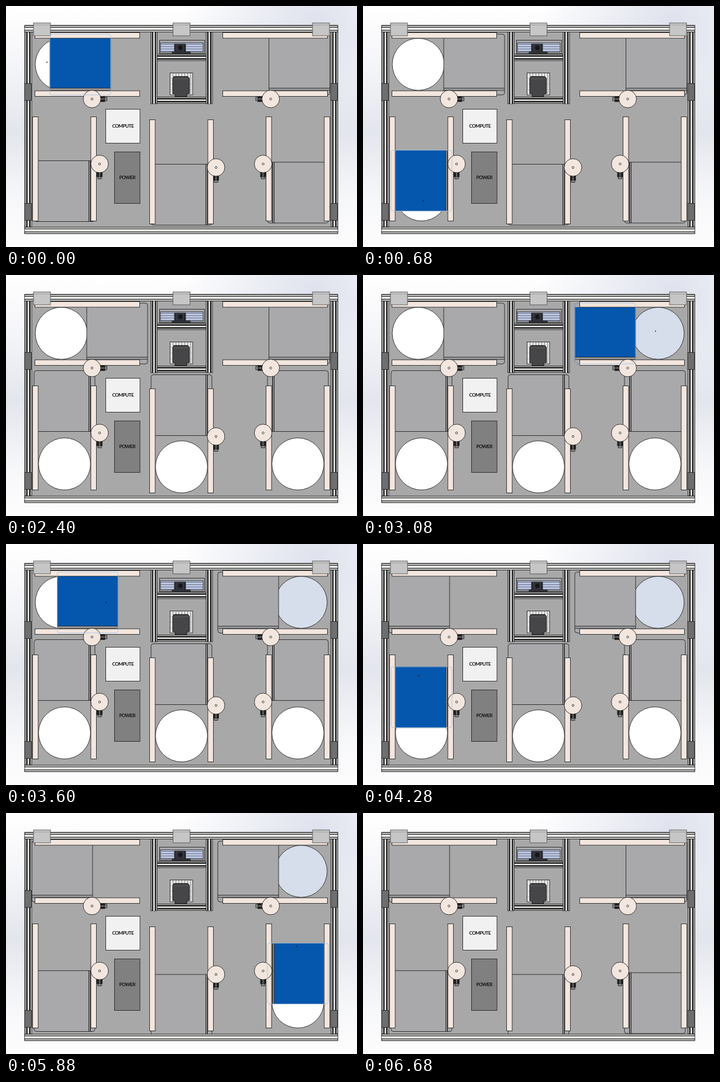
Animation of 600 by 412 pixels, one loop 6800 ms. Source, as an HTML page:

```html
<!DOCTYPE html>
<html lang="en">
<head>
<meta charset="utf-8">
<title>Sliding tray layout</title>
<style>
html, body { margin: 0; width: 100%; height: 100%; overflow: hidden; background: #fff; }
svg { display: block; width: 600px; height: 412px; }
text { font: 700 8.3px Lato, "Open Sans", sans-serif; letter-spacing: -.6px; text-anchor: middle; fill: #141414; }
</style>
</head>
<body>
<svg id="stage" viewBox="0 0 600 412" xmlns="http://www.w3.org/2000/svg">
  <defs>
    <linearGradient id="side" x1="0" y1="0" x2="0" y2="1">
      <stop offset="0" stop-color="#fff"/>
      <stop offset=".25" stop-color="#f4f5f8"/>
      <stop offset=".52" stop-color="#e4e6ed"/>
      <stop offset=".8" stop-color="#f6f7f9"/>
      <stop offset="1" stop-color="#fdfdfe"/>
    </linearGradient>
    <radialGradient id="haze" gradientUnits="userSpaceOnUse" cx="530" cy="30" r="230">
      <stop offset="0" stop-color="#dfe2ed"/>
      <stop offset="1" stop-color="#dfe2ed" stop-opacity="0"/>
    </radialGradient>
  </defs>
  <rect width="600" height="412" fill="url(#side)"/>
  <rect width="600" height="412" fill="url(#haze)"/>
</svg>
<script>
const stage = document.getElementById('stage');
const LOOP = 6800, SIZE = 104;
const INK = '#262626', WOOD = '#f2e6de', BLUE = '#0457ad', GLOW = '#a9c3e3';

function add(parent, tag, attrs, text) {
  const el = document.createElementNS(stage.namespaceURI, tag);
  for (const key in attrs) el.setAttribute(key, attrs[key]);
  if (text) el.textContent = text;
  parent.appendChild(el);
  return el;
}
const layer = () => add(stage, 'g', {});
const box = (parent, x, y, width, height, fill, stroke = INK, rx = 0) =>
  add(parent, 'rect', { x, y, width, height, fill, stroke, rx, 'stroke-width': .9 });
const line = (parent, x1, y1, x2, y2, stroke = INK, width = 1) =>
  add(parent, 'line', { x1, y1, x2, y2, stroke, 'stroke-width': width });
const disc = (parent, cx, cy, r, fill) =>
  add(parent, 'circle', { cx, cy, r, fill, stroke: INK, 'stroke-width': .9 });

// Slotted aluminium profile; grooves run along the longer side.
function profile(parent, x, y, w, h, slot) {
  box(parent, x, y, w, h, '#cbccca', '#222');
  const mid = Math.min(w, h) / 2;
  const groove = (d, color, width) => w > h
    ? line(parent, x, y + d, x + w, y + d, color, width)
    : line(parent, x + d, y, x + d, y + h, color, width);
  groove(mid, '#f0f0ed', 2.4);
  for (const off of [-2.5, 2.5]) groove(mid + off, '#1d1d1d', slot);
}

// Bays with two upright rails: left edge and top
const bays = [[45.5, 189.5], [245.5, 194.5], [444.5, 189.5]];

// A move is start, end, first place, last place; the grab point follows.
const move = (start, end, from, to, gx, gy) => ({ start, end, from, to, gx, gy });
const row = (cx, tint, ...moves) => ({ flat: true, at: 48, cx, cy: 99.7, tint, moves });
const column = (bay, ...moves) => {
  const [x, top] = bays[bay];
  return { at: x + 2.5, cx: x + 54.5, cy: top + 133.5, tint: '#fff', flip: bay === 2, moves };
};
const trays = [
  row(94.5, '#fff', move(0, 400, 75, 138, 70, 96), move(3300, 3860, 138, 44, 171, 100)),
  column(0, move(600, 1050, 264.5, 163.5, 103, 333), move(4000, 4640, 163.5, 269.5, 95, 225)),
  column(1, move(1200, 1625, 270.5, 170.5, 306, 340), move(4760, 5280, 170.5, 276, 322, 228)),
  column(2, move(1860, 2260, 267, 163.5, 500, 330), move(5600, 6120, 163.5, 273, 497, 228)),
  row(504.5, '#d6ddeb', move(2450, 3080, 449.5, 362, 500, 96), move(6180, 6660, 362, 449.5, 410, 98))
];

// Base plate, discs and trays
const base = layer();
box(base, 32, 33, 535, 356, '#a9a8a9');
for (const t of trays) disc(base, t.cx, t.cy, 44.5, t.tint);
for (const t of trays) {
  t.body = add(base, 'g', {});
  if (t.flat) {
    box(t.body, 0, t.at, SIZE, SIZE, '#a9a8aa', INK, 4);
    t.fill = box(t.body, 0, 55, SIZE, 85, BLUE, 'none');
    for (const y of [140.5, 144]) line(t.body, 0, y, SIZE, y);
  } else {
    const out = t.flip ? -1 : 1, edge = t.at + (t.flip ? 11 : 93);
    box(t.body, t.at, 0, SIZE, SIZE, '#a9a8aa', INK, 4);
    t.fill = box(t.body, t.flip ? edge : t.at + 8, 0, 85, SIZE, BLUE, 'none');
    line(t.body, edge + .5, 0, edge + .5, SIZE);
    line(t.body, edge + .5 + out * 2.7, 0, edge + .5 + out * 2.7, SIZE, '#2a2a2a', 1.6);
  }
}

// Outer frame and centre bay
const frame = layer();
for (const x of [32.5, 555.5]) {
  profile(frame, x, 44.5, 11.5, 333, 2.4);
  for (const y of [132.5, 337.5]) box(frame, x - .5, y, 11.5, 29, '#6e6e6f');
}
for (const y of [33.5, 378]) profile(frame, 32, y, 535, 11, 1);
for (const y of [82.5, 155.5]) profile(frame, 258, y, 84, 11, 2.4);
for (const x of [247.5, 342]) profile(frame, x, 44.5, 11, 122.5, 2.4);

// Fan unit
box(frame, 262.5, 58.5, 77, 23, '#a9aaad');
box(frame, 264, 63, 73, 16, '#bfc8e0');
for (let y = 65.5; y < 79; y += 4) line(frame, 264, y, 337, y, '#65708f');
box(frame, 288, 65, 19, 14, '#25272d');
for (let x = 291; x < 306; x += 3) line(frame, x, 66, x, 78, '#59606f', .7);
disc(frame, 298, 71.5, 4, '#15161a');
box(frame, 284, 78.5, 31, 2.5, '#33363e');

// Heat sink and camera
box(frame, 280.5, 114.5, 38.5, 37.5, '#e4e4e2');
for (let x = 285.5; x < 318; x += 5) line(frame, x, 115, x, 152, '#777', .8);
for (let y = 123.5; y < 150; y += 10) line(frame, 281, y, 319, y, '#aaa', .6);
add(frame, 'path', { d: 'M287 120.5H311L313.5 124V150H309V155H289V150H285V124Z', fill: '#464648', stroke: '#181818' });
line(frame, 286, 124.5, 313, 124.5, '#666', .7);

// Wooden rails and top brackets
const rails = layer();
for (const x of [49.5, 370.5])
  for (const y of [45.5, 145]) box(rails, x, y, 179, 9.5, WOOD);
for (const [x, y] of bays)
  for (const dx of [0, 99.5]) box(rails, x + dx, y, 9.5, 178, WOOD);
for (const x of [47, 285.5, 524]) {
  box(rails, x, 29, 29, 22, '#c5c6c5', '#555');
  line(rails, x, 32.5, x + 29, 32.5, '#888', .6);
}

// Wheel with a motor turned by the given angle
function wheel(x, y, angle) {
  const g = add(rails, 'g', { transform: `translate(${x} ${y}) rotate(${angle})` });
  box(g, 12, -4.5, 10, 9, '#202020');
  line(g, 13, 0, 22, 0, '#6c6c6f', 2);
  box(g, 22, -3, 3.5, 6, '#8f8f90');
  disc(g, 0, 0, 15, WOOD);
  disc(g, 0, 0, 1.7, '#fff');
}
wheel(147, 159, 0);
wheel(452.5, 159, 180);
for (const [x, y] of [[160, 270], [359, 276], [439.5, 270]]) wheel(x, y, 90);

// Labelled units
function unit(x, y, w, h, fill, label) {
  box(rails, x, y, w, h, fill);
  add(rails, 'text', { x: x + w / 2, y: y + h / 2 + .5 }, label).setAttribute('dominant-baseline', 'middle');
}
unit(170.5, 176.5, 58.5, 58, '#f1f1f1', 'COMPUTE');
unit(185.5, 249.5, 43.5, 88, '#808080', 'POWER');

// Drag outline and grab point stay above everything else
for (const t of trays) {
  t.glow = box(stage, t.flat ? 0 : t.at, t.flat ? t.at : 0, SIZE, SIZE, 'none', GLOW, 4);
  t.dot = add(stage, 'circle', { r: .9, fill: '#111' });
}

function place({ start, end, from, to }, time) {
  const part = Math.min(1, Math.max(0, (time - start) / (end - start)));
  return from + (to - from) * part;
}

// The picture advances in three uneven steps every 400 ms.
function stepTime(ms) {
  const rest = ms % 400;
  return ms - rest + (rest < 120 ? 0 : rest < 280 ? 120 : 280);
}

function draw(ms) {
  const time = stepTime(ms % LOOP);
  for (const t of trays) {
    const [opening, closing] = t.moves;
    const now = time < closing.start ? opening : closing;
    const p = place(now, time);
    const shift = t.flat ? `translate(${p} 0)` : `translate(0 ${p})`;
    const held = time >= now.start && time <= now.end;
    for (const el of [t.body, t.glow]) el.setAttribute('transform', shift);
    for (const el of [t.fill, t.glow, t.dot]) el.setAttribute('visibility', held ? 'visible' : 'hidden');
    t.dot.setAttribute('cx', now.gx);
    t.dot.setAttribute('cy', now.gy);
  }
}

const start = performance.now();
function tick() {
  draw(performance.now() - start);
  requestAnimationFrame(tick);
}
draw(0);
requestAnimationFrame(tick);
</script>
</body>
</html>
```
